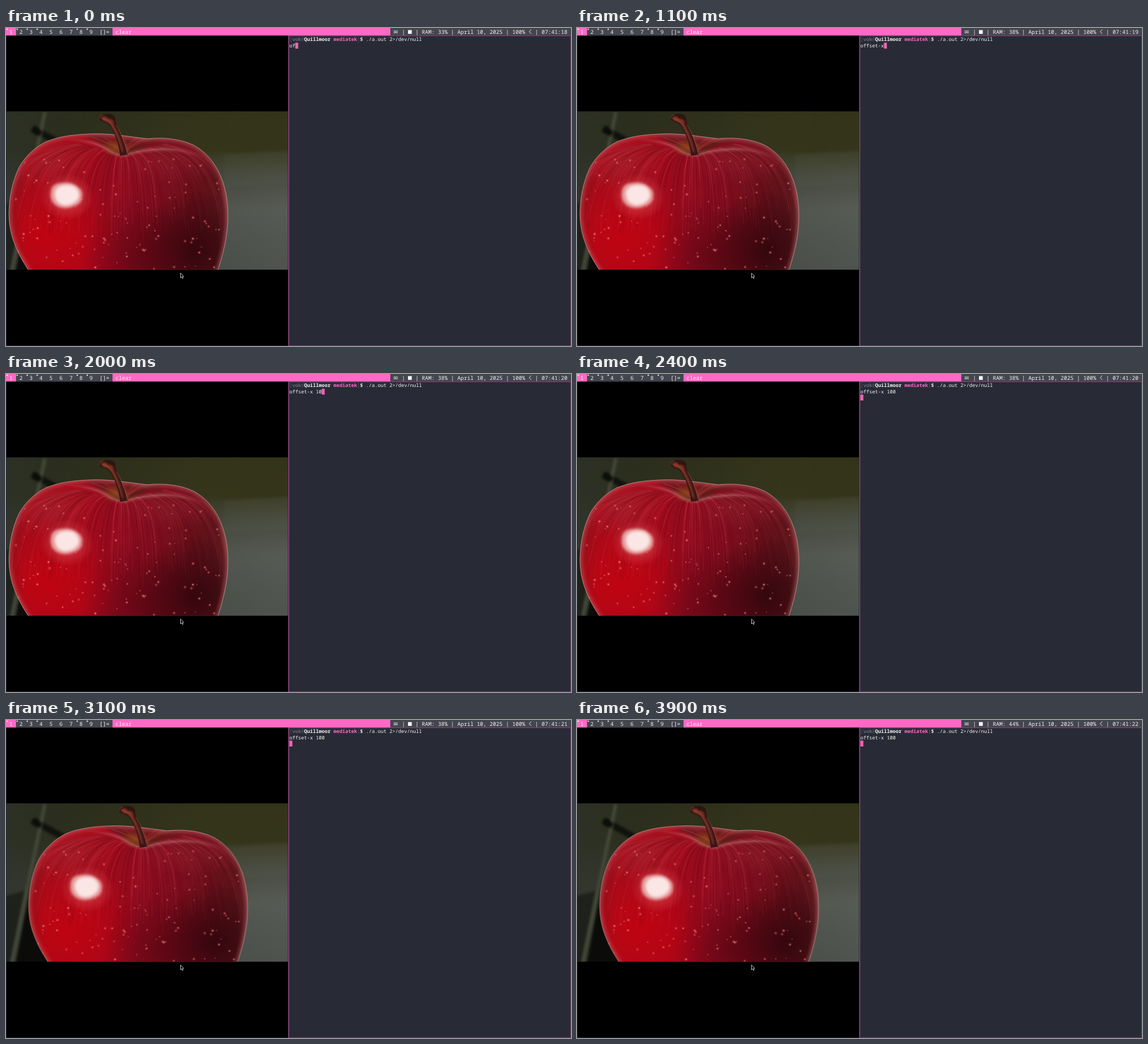
Write an HTML page with a canvas that moves like this. It is 960 by 540 pixels and loops after 4 s.

```html
<!DOCTYPE html>
<html lang="en">
<head>
<meta charset="utf-8">
<title>Apple viewer</title>
<style>
html, body { margin: 0; width: 100%; height: 100%; overflow: hidden; background: #000; }
canvas { display: block; }
</style>
</head>
<body>
<canvas id="stage" width="960" height="540"></canvas>
<script>
const LOOP = 4000;
const PINK = '#ff69c6', BAR = '#44464f', WHITE = '#f4f4f2', BG = '#282b36';
const MONO = '"Noto Sans Mono", "DejaVu Sans Mono", monospace';
const PHOTO = { x: 1, y: 141.5, w: 478, h: 269 };
const BAR_H = 12.5, CELL = 5;
const ctx = document.getElementById('stage').getContext('2d');

function layer(draw) {
  const canvas = document.createElement('canvas');
  canvas.width = 480;
  canvas.height = 540;
  draw(canvas.getContext('2d'));
  return canvas;
}

function seeded(seed) {
  return () => (seed = (seed * 16807) % 2147483647) / 2147483647;
}

function box(c, color, x, y, w, h) {
  c.fillStyle = color;
  c.fillRect(x, y, w, h);
}

function linear(c, x0, y0, x1, y1, stops) {
  const g = c.createLinearGradient(x0, y0, x1, y1);
  stops.forEach(([at, color]) => g.addColorStop(at, color));
  return g;
}

// Soft ellipse that fades to nothing at its edge.
function glow(c, x, y, rx, ry, rgb, alpha) {
  c.save();
  c.translate(x, y);
  c.scale(rx, ry);
  const g = c.createRadialGradient(0, 0, 0, 0, 0, 1);
  g.addColorStop(0, `rgba(${rgb},${alpha})`);
  g.addColorStop(0.5, `rgba(${rgb},${alpha * 0.55})`);
  g.addColorStop(1, `rgba(${rgb},0)`);
  box(c, g, -1, -1, 2, 2);
  c.restore();
}

function stroke(c, color, width, path) {
  c.strokeStyle = color;
  c.lineWidth = width;
  c.stroke(new Path2D(path));
}

function fill(c, color, path) {
  c.fillStyle = color;
  c.fill(new Path2D(path));
}

function blurred(c, radius, draw) {
  c.filter = `blur(${radius}px)`;
  draw();
  c.filter = 'none';
}

function drawWall(c) {
  const { x, y, w, h } = PHOTO;
  box(c, linear(c, 0, y, 0, y + h, [
    [0, '#34351c'], [0.24, '#38391f'], [0.4, '#484b3f'], [0.62, '#575b55'], [1, '#4e534f']
  ]), x, y - 1, w, h + 2);
  box(c, linear(c, 0, 0, 480, 0, [
    [0, 'rgba(44,48,39,.85)'], [0.2, 'rgba(38,42,30,.65)'], [0.6, 'rgba(36,38,24,.2)'], [1, 'rgba(44,46,34,0)']
  ]), x, y - 1, w, h + 2);
  blurred(c, 2, () => {
    fill(c, linear(c, 200, 0, 400, 0, [[0, 'rgba(52,52,24,0)'], [1, 'rgba(52,52,24,.7)']]),
      'M200 135H490V207L370 213L200 204Z');
    fill(c, 'rgba(98,104,92,.13)', 'M370 214L490 208V264L370 271Z');
    fill(c, 'rgba(16,18,14,.55)', 'M-5 300L32 290L8 415H-5Z');
    fill(c, 'rgba(7,8,6,.9)', 'M42 275L110 250V415H16Z');
    stroke(c, '#10120d', 11, 'M45 171L76 187L106 204');
    stroke(c, '#444938', 6, 'M66 143L10 412');
    stroke(c, '#0c0e0a', 9, 'M46 171L60 180');
  });
}

const RIM = 'M44 420C32 402 23 388 16 370C9 353 5 336 5 313C6 287 10 263 22 237' +
  'C32 219 48 203 68 193C90 184 115 181 140 180C173 178 205 184 240 188' +
  'C270 185 298 189 319 199C343 212 359 234 368 260C375 281 377 299 377 320' +
  'C377 351 370 383 357 420';

function drawSkin(c) {
  const rand = seeded(71);
  box(c, linear(c, 5, 0, 378, 0, [
    [0, '#86141f'], [0.08, '#a60b1a'], [0.3, '#a60819'], [0.48, '#930a1e'],
    [0.62, '#810a1c'], [0.82, '#690e1a'], [0.95, '#5c141b'], [1, '#75282e']
  ]), 0, 141, 480, 275);
  glow(c, 70, 355, 125, 110, '205,0,14', 0.65);
  glow(c, 322, 378, 105, 105, '25,2,6', 0.65);
  glow(c, 220, 390, 90, 110, '55,4,12', 0.4);
  glow(c, 285, 222, 100, 45, '160,35,48', 0.45);
  glow(c, 75, 225, 75, 55, '176,52,60', 0.4);

  // Grain fans out from the hollow around the stem.
  for (let i = 0; i < 420; i++) {
    const u = rand() * 2 - 1, drop = 25 + rand() * 130;
    const x = 196 + u * 75, y = 214 - Math.abs(u) * 18;
    const alpha = (0.04 + rand() * 0.09).toFixed(3);
    const rgb = rand() < 0.5 ? '225,85,95' : '62,0,12';
    stroke(c, `rgba(${rgb},${alpha})`, 0.5 + rand() * 1.3,
      `M${x} ${y}Q${196 + u * 165} ${y + 15} ${194 + u * 182} ${y + drop}`);
  }
  for (let i = 0; i < 120; i++) {
    const x = 16 + rand() * 350, y = 222 + rand() * 187, r = 0.5 + rand() * 0.8;
    glow(c, x, y, r * 3, r * 3, '230,95,100', 0.4);
    c.fillStyle = `rgba(240,150,148,${0.25 + rand() * 0.5})`;
    c.beginPath();
    c.arc(x, y, r, 0, Math.PI * 2);
    c.fill();
  }
}

function drawHollow(c) {
  blurred(c, 1, () => fill(c, linear(c, 0, 178, 0, 218, [[0, '#7b1420'], [0.6, '#651a1a'], [1, '#54200f']]),
    'M133 181Q185 177 239 188L280 190Q240 197 226 207Q208 217 190 214Q168 200 133 181Z'));
  glow(c, 186, 203, 25, 15, '135,72,24', 0.85);
  const rand = seeded(19);
  for (let i = 0; i < 45; i++) {
    const x = 145 + rand() * 112;
    stroke(c, `rgba(205,80,74,${0.08 + rand() * 0.2})`, 0.8,
      `M${x} ${183 + rand() * 5}Q${(x + 195) / 2} 193 ${190 + rand() * 18} 210`);
  }
  const fade = (alpha) => linear(c, 100, 0, 335, 0, [
    [0, 'rgba(205,140,138,0)'], [0.25, `rgba(205,140,138,${alpha})`],
    [0.7, `rgba(205,140,138,${alpha})`], [1, 'rgba(205,140,138,0)']
  ]);
  const lip = 'M104 189Q148 191 170 205Q186 217 203 216Q222 209 246 207Q290 201 335 219';
  blurred(c, 2, () => stroke(c, fade(0.5), 4, lip));
  stroke(c, fade(0.35), 0.8, lip);
}

function drawStem(c) {
  fill(c, '#341512', 'M158 151Q161 147 169 146Q181 144 186 153Q185 160 190 170Q200 190 207 215L194 217Q191 190 179 170Q174 161 166 160Q157 157 158 151Z');
  blurred(c, 0.8, () => {
    fill(c, linear(c, 165, 150, 202, 210, [[0, '#7c3323'], [0.45, '#6c2820'], [1, '#45161a']]),
      'M161 152Q170 148 178 152Q183 157 184 166Q196 184 204 214L196 215Q193 190 181 168Q176 159 166 158Z');
    stroke(c, 'rgba(190,98,72,.6)', 1.4, 'M164 154Q173 155 179 164Q192 185 198 210');
    fill(c, '#2b1713', 'M170 148Q180 145 184 151Q183 157 175 154Q169 152 170 148Z');
  });
  stroke(c, 'rgba(190,135,116,.6)', 0.7, 'M159 154Q158 149 165 148M187 165Q201 187 206 214');
}

function drawShine(c) {
  glow(c, 104, 287, 46, 40, '225,85,92', 0.75);
  blurred(c, 2, () => {
    fill(c, '#e6a09f', 'M76 279Q77 264 94 263Q111 260 121 269Q132 276 129 288Q128 299 116 302Q102 309 88 303Q74 296 76 279Z');
    fill(c, '#fae6e4', 'M83 280Q86 268 99 267Q115 265 121 274Q127 283 121 292Q113 301 99 301Q83 298 83 280Z');
  });
}

function drawApple(c) {
  c.save();
  c.clip(new Path2D(RIM));
  drawSkin(c);
  drawHollow(c);
  drawShine(c);
  blurred(c, 3, () => stroke(c, 'rgba(205,130,128,.5)', 6, RIM));
  c.restore();
  stroke(c, 'rgba(212,165,158,.7)', 1, RIM);
  drawStem(c);
}

const wall = layer(drawWall), apple = layer(drawApple);

function text(str, x, y, size, color, bold) {
  ctx.font = `${bold ? 'bold ' : ''}${size}px ${MONO}`;
  ctx.fillStyle = color;
  ctx.fillText(str, x, y);
}

function barText(str, x) {
  text(str, x, 9.8, 9.17, WHITE);
}

function termText(str, column, row, color = WHITE, bold = false) {
  text(str, 481.5 + column * CELL, 22.2 + row * 10.3, 8.333, color, bold);
}

function drawBar(t) {
  box(ctx, BAR, 0, 0, 960, BAR_H);
  box(ctx, PINK, 0, 0, 17, BAR_H);
  box(ctx, PINK, 181, 0, 472, BAR_H);
  for (let i = 0; i < 9; i++) {
    barText(String(i + 1), i * 17 + 5.75);
    if (i < 4 || i > 6) {
      ctx.strokeStyle = WHITE;
      ctx.lineWidth = 0.7;
      ctx.strokeRect(i * 17 + 1.3, 1.3, 1.5, 1.5);
    }
  }
  barText('[]=', 159);
  barText('clear', 186);

  ctx.font = '9.17px "DejaVu Sans", sans-serif';
  ctx.fillText('✉', 658.3, 9.6);
  barText('|', 672.5);
  box(ctx, WHITE, 683, 3.5, 6.5, 6.5);
  const ram = t < 300 ? 33 : t < 3300 ? 38 : 44;
  const second = 18 + Math.floor((t + 100) / 1000);
  barText(`| RAM: ${ram}% | April 10, 2025 | 100%`, 695.5);
  stroke(ctx, WHITE, 0.9, 'M892.5 2.5L889 6.3L892.5 10');
  barText(`| 07:41:${second}`, 899);
}

const KEYS = [100, 200, 400, 500, 900, 1100, 1300, 1900, 2000, 2200];
const ENTER = 2400, SHIFT = 2500;

function drawTerminal(t) {
  box(ctx, BG, 480, BAR_H, 480, 540 - BAR_H);
  stroke(ctx, '#b84c97', 1, 'M480.5 540V13H960');
  stroke(ctx, '#75406f', 1, 'M959.5 13.5V539.5H481');

  const dim = '#555968';
  termText('[', 0, 0, dim);
  termText('vok', 1, 0, '#858998');
  termText('@', 4, 0, dim);
  termText('Quillmoor', 5, 0, WHITE, true);
  termText('mediatek', 15, 0, PINK, true);
  termText(']', 23, 0, dim);
  termText('$', 24, 0, WHITE, true);
  termText('./a.out 2>/dev/null', 26, 0);

  const count = 2 + KEYS.filter(at => t >= at).length;
  termText('offset-x 100'.slice(0, count), 0, 1);
  const entered = t >= ENTER;
  box(ctx, '#f163b4', 481.5 + (entered ? 0 : count * CELL), entered ? 35 : 25, CELL, 10);
}

function drawViewer(t) {
  box(ctx, '#000', 0, BAR_H, 480, 540 - BAR_H);
  ctx.save();
  ctx.beginPath();
  ctx.rect(PHOTO.x, PHOTO.y, PHOTO.w, PHOTO.h);
  ctx.clip();
  ctx.drawImage(wall, 0, 0);
  ctx.drawImage(apple, t >= SHIFT ? 33.5 : 0, 0);
  ctx.restore();
  ctx.strokeStyle = '#242630';
  ctx.lineWidth = 1;
  ctx.strokeRect(0.5, 13, 479, 526.5);
  const pointer = 'M296.5 416V424.2L298.4 422.5L299.7 425.3L301 424.7L299.8 422L302 421.8Z';
  fill(ctx, '#000', pointer);
  stroke(ctx, '#e8e8e8', 0.8, pointer);
}

ctx.textRendering = 'geometricPrecision';
const start = performance.now();

function frame() {
  const t = Math.max(0, performance.now() - start) % LOOP;
  drawViewer(t);
  drawTerminal(t);
  drawBar(t);
  requestAnimationFrame(frame);
}
frame();
</script>
</body>
</html>
```
